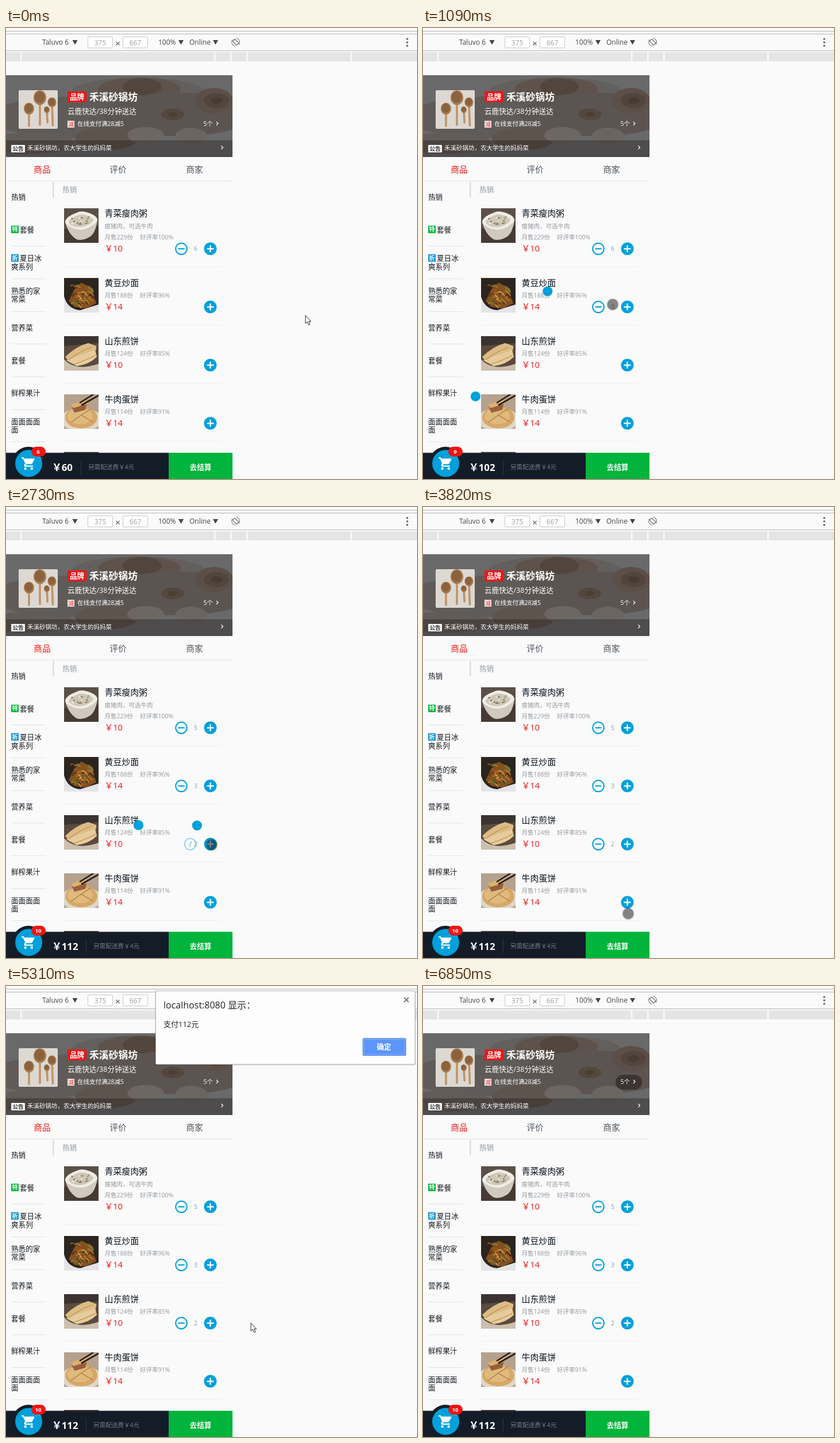
An HTML page that plays this animation: 715x783 px, repeating every 8.28 s.

```html
<!DOCTYPE html>
<html lang="zh-CN">
<head>
<meta charset="utf-8">
<style>
html, body { margin: 0; width: 100%; height: 100%; overflow: hidden; background: #fafafa; }
svg { display: block; font-family: "Open Sans", "Noto Sans CJK SC", "Noto Sans CJK", sans-serif; }
</style>
</head>
<body>
<svg id="stage" width="715" height="783" viewBox="0 0 715 783"></svg>
<script>
const LOOP = 8280;
const BLUE = '#00a0dc', RED = '#f01414', GREY = '#93999f', INK = '#07111b';

// Screen refreshes: [first, last, count]
const REFRESHES = [
  [0, 0, 1], [120, 1090, 8], [1240, 1760, 5], [2030, 3010, 8], [3160, 4060, 8],
  [4210, 4210, 1], [4610, 4730, 2], [5310, 5880, 5], [6160, 6850, 6]
];
// Cursor path: [time, x, y]
const PATH = [
  [0, 521, 499], [120, 505, 498], [540, 358, 486], [960, 356, 484], [1090, 330, 480],
  [1630, 305, 391], [2030, 305, 391], [2450, 358, 586], [3160, 358, 587], [3803, 357, 706],
  [4060, 354, 753], [4210, 339, 760], [5170, 339, 760], [5310, 426, 585], [5880, 640, 112],
  [6160, 640, 119], [6850, 480, 770]
];
// Taps: [time, dish, change]
const TAPS = [[590, 1, 1], [755, 1, 1], [920, 1, 1], [1700, 0, -1], [2578, 2, 1], [2712, 2, 1]];
const DISHES = [
  { name: '青菜瘦肉粥', sold: 229, rate: 100, price: 10, start: 6, y: 313, desc: '瘦猪肉，可选牛肉' },
  { name: '黄豆炒面', sold: 188, rate: 96, price: 14, start: 0, y: 434 },
  { name: '山东煎饼', sold: 124, rate: 85, price: 10, start: 0, y: 535 },
  { name: '牛肉蛋饼', sold: 114, rate: 91, price: 14, start: 0, y: 636 }
];
const buttonY = d => d.y + (d.desc ? 70 : 50);

const rect = (x, y, w, h, fill, extra = '') =>
  `<rect x="${x}" y="${y}" width="${w}" height="${h}" fill="${fill}" ${extra}/>`;
const oval = (x, y, rx, ry, fill, extra = '') =>
  `<ellipse cx="${x}" cy="${y}" rx="${rx}" ry="${ry}" fill="${fill}" ${extra}/>`;
const disc = (x, y, r, fill, extra) => oval(x, y, r, r, fill, extra);
const text = (s, x, y, size, fill, extra = '') =>
  `<text x="${x}" y="${y}" font-size="${size}" fill="${fill}" ${extra}>${s}</text>`;
const line = (d, color, width, extra = '') =>
  `<path d="${d}" fill="none" stroke="${color}" stroke-width="${width}" ${extra}/>`;
const shape = (d, fill) => `<path d="${d}" fill="${fill}"/>`;
const group = (attrs, body) => `<g ${attrs}>${body}</g>`;
const BOLD = 'font-weight="700"', MID = 'text-anchor="middle"', BOLD_MID = BOLD + ' ' + MID;

function seeded(seed) {
  return () => (seed = (seed * 16807) % 2147483647) / 2147483647;
}

function toolbar() {
  const arrow = x => shape(`M${x} 21h9l-4.5 8z`, '#444');
  const field = (x, s) => rect(x + .5, 15.5, 43, 19, '#fff', 'stroke="#c8c8c8" rx="1"') +
    text(s, x + 22, 30, 12, '#a0a0a0', MID);
  return line('M0 5.5H715M0 10.5H715M0 39.5H715', '#b4b4b4', 1) +
    text('Taluvo 6', 63, 29, 12, '#444') + arrow(115.5) + field(142, 375) +
    line('M191.5 24l6 6m0-6l-6 6', '#666', 1.1) + field(203, 667) +
    text('100%', 265, 29, 12, '#444') + arrow(300) + text('Online', 319, 29, 12, '#444') + arrow(360) +
    group('transform="translate(399.5 24.5) rotate(-45)"',
      rect(-2.8, -5, 5.6, 10, 'none', 'stroke="#6e6e6e" stroke-width="1.3" rx="1"') +
      line('M-5.6 4A7 7 0 0 1-1-6.9M5.6-4A7 7 0 0 1 1 6.9', '#777', 1)) +
    [19, 25, 31].map(y => disc(698, y, 1.8, '#666')).join('') +
    rect(0, 42, 715, 16, '#e5e5e5') +
    [26, 363, 391, 419, 600].map(x => rect(x - 1, 42, 2.5, 16, '#fafafa')).join('');
}

function avatar() {
  const spoon = (x, y, r, h, tilt) => group(`transform="rotate(${tilt} ${x} ${y})"`,
    rect(x - 1.8, y, 3.6, h, '#bd946a', 'rx="1.8"') + oval(x, y, r, r * 1.15, '#a77a4f') +
    oval(x - .5, y - 1, r * .8, r * .9, '#8b623e'));
  return rect(22, 108, 68, 67, '#ddd8d1', 'rx="2"') +
    spoon(40, 140, 9, 32, 0) + spoon(59, 121, 11, 49, 0) +
    spoon(71, 142, 5, 24, -3) + spoon(80, 129, 7.5, 42, -2);
}

function header() {
  const blobs = [
    [230, 110, 115, 24, '#635f5c'], [232, 106, 72, 20, '#5d534c'], [237, 102, 34, 15, '#52463c'],
    [120, 155, 150, 36, '#5f5b58'], [300, 150, 130, 38, '#5b5451'], [290, 150, 20, 10, '#54473d'],
    [290, 150, 8, 4, '#4a3e35'], [362, 126, 33, 22, '#5b4f48'], [366, 126, 22, 13, '#51453d'],
    [366, 126, 10, 6, '#473b33'], [40, 200, 80, 18, '#625c58'], [175, 192, 55, 20, '#5d544e'],
    [243, 186, 32, 14, '#6d6763'], [322, 188, 28, 15, '#6b6561']
  ];
  const chevron = (x, y) => line(`M${x} ${y - 3}l3 3-3 3`, '#fff', 1.2);
  return group('clip-path="url(#head)"', rect(0, 82, 394, 142, '#69696a') +
      blobs.map(b => oval(...b)).join('') + rect(0, 195, 394, 29, '#17120f', 'opacity=".32"')) +
    avatar() + rect(107, 110, 33, 19, '#e8191c', 'rx="2"') +
    text('品牌', 123.5, 124, 12.6, '#fff', BOLD_MID) +
    text('禾溪砂锅坊', 145, 126, 16.8, '#fff', BOLD) +
    text('云鹿快达/38分钟送达', 107, 149, 12.6, '#fff') +
    rect(107, 161, 12, 12, '#fbe3e1') + text('减', 113, 171, 10, '#d9443f', MID) +
    text('在线支付满28减5', 124, 170, 10.5, '#fff') +
    group('id="pill"', rect(335, 154, 46, 26, '#302a28', 'rx="13" opacity=".75"')) +
    text('5个', 343.5, 170, 10.5, '#fff') + chevron(366, 166) +
    rect(9, 203, 24, 13, '#f5f5f5', 'rx="1"') + text('公告', 21, 213, 9.5, '#333', BOLD_MID) +
    text('禾溪砂锅坊，农大学生的妈妈菜', 37, 212, 10.5, '#fff') + chevron(374.5, 207.5) +
    text('商品', 63, 250.5, 14.7, RED, MID) + text('评价', 195, 250.5, 14.7, '#4d555d', MID) +
    text('商家', 328, 250.5, 14.7, '#4d555d', MID) + rect(0, 265, 394, 1, '#e3e4e5');
}

function sidebar() {
  const rows = [['热销'], ['套餐'], ['夏日冰', '爽系列'], ['熟悉的家', '常菜'], ['营养菜'],
    ['套餐'], ['鲜榨果汁'], ['面面面面', '面']];
  const icons = { 1: ['特', '#00b43c'], 2: ['折', '#1296db'] };
  return rows.map((words, i) => {
    const mid = 293.5 + i * 56.7, top = mid + 4.5 - (words.length - 1) * 7.2, icon = icons[i];
    return words.map((w, n) => text(w, icon && !n ? 24 : 9, top + n * 14.4, 12.6, '#14191f')).join('') +
      (icon ? rect(9, top - 11.5, 13, 13, icon[1]) +
        text(icon[0], 15.5, top - 1.3, 10, '#fff', BOLD_MID) : '') +
      (i ? rect(9, Math.round(mid + 28), 60, 1, '#e3e4e6') : '');
  }).join('');
}

function porridge() {
  const rnd = seeded(17);
  let s = rect(0, 0, 60, 60, '#5b5048') + shape('M0 36L60 30V60H0z', '#463b33') +
    shape('M2 24Q8 46 22 54Q32 57 44 50Q55 44 58 20z', '#cfc9bf') +
    shape('M2 24Q2 17 14 11L26 6Q34 4 46 9Q58 14 58 21Q55 28 40 35Q26 40 14 34Q3 29 2 24z', '#efece5') +
    shape('M8 23Q12 16 27 11Q38 9 51 19Q51 25 37 31Q24 35 14 30Q8 27 8 23z', '#cfc7b6');
  for (let i = 0; i < 22; i++)
    s += oval(14 + rnd() * 32, 15 + rnd() * 13, 1.7, 1.2, ['#77796a', '#a48d74', '#eee8d8'][i % 3]);
  return s;
}
function noodles() {
  const rnd = seeded(91);
  let s = rect(0, 0, 60, 60, '#2b241f') + shape('M0 32Q6 54 28 56L60 46V60H0z', '#e4e3e5') +
    shape('M8 40L18 20 30 8 42 14 52 32 56 44 38 53 18 50z', '#84501f');
  for (let i = 0; i < 46; i++) {
    const x = 12 + rnd() * 32, y = 14 + rnd() * 32;
    s += line(`M${x} ${y}q${rnd() * 12 - 3} ${-8 * rnd()} 9 ${rnd() * 12 - 4}`,
      ['#c07c30', '#96561f', '#d39a4c', '#5c742c', '#4c2c14'][i % 5], 1.7);
  }
  return s;
}
function pancakes() {
  return rect(0, 0, 60, 60, '#5b4a3e') + shape('M0 0H60V12L0 17z', '#3a3331') +
    shape('M0 40Q20 62 60 48V60H0z', '#cdbfae') +
    shape('M2 36Q20 18 42 12L56 17Q58 30 36 42L10 46z', '#dcbc84') +
    shape('M4 42Q24 34 54 24L57 36Q44 49 22 52z', '#e6cc9c') +
    line('M8 41Q26 27 48 19M16 49Q36 43 55 33', '#b98c52', 1.2);
}
function beefCake() {
  return rect(0, 0, 60, 60, '#b5a18d') + oval(30, 44, 36, 20, '#dfd5c8') +
    oval(30, 40, 28, 19, '#d5a866') + oval(28, 38, 22, 14, '#e0ba7c') +
    line('M30 36L50 48M30 36L12 49M30 36L47 25', '#a9783f', 1.2) +
    shape('M13 22L40 14 37 27 18 32z', '#96603f') + shape('M12 18L38 9 42 16 16 24z', '#ddb06c') +
    line('M60 2L30 19M51 0L27 15', '#2a1d18', 2.6);
}

function dish(d, i) {
  const shift = d.desc ? 20 : 0, y = d.y, by = buttonY(d);
  const photo = [porridge, noodles, pancakes, beefCake][i]();
  return `<svg x="101" y="${y}" width="60" height="60">${photo}</svg>` +
    text(d.name, 171.5, y + 14, 14.9, INK) + (d.desc ? text(d.desc, 171.5, y + 34.5, 10.5, GREY) : '') +
    text(`月售${d.sold}份`, 171.5, y + 34 + shift, 10.5, GREY) +
    text(`好评率${d.rate}%`, 233, y + 34 + shift, 10.5, GREY) +
    text('￥' + d.price, 171.5, y + 54.5 + shift, 14.7, RED) +
    rect(101, y + 81 + shift, 274, 1, '#eeeff0') +
    disc(355.5, by + .3, 11, BLUE) + line(`M349.5 ${by + .3}h12m-6-6v12`, '#fff', 2.2) +
    group(`id="minus${i}"`, disc(0, 0, 9.8, 'none', `stroke="${BLUE}" stroke-width="2.1"`) +
      line('M-5.5 0H5.5', BLUE, 2.2)) +
    text('', 330, by + 4, 10.5, GREY, `id="count${i}" ` + MID);
}

function cartIcon() {
  return group('transform="translate(26 743) scale(1.1)"',
    shape('M1 2v2h2l3.6 7.6-1.4 2.4a2 2 0 0 0 1.8 3h12v-2H7.4l1.1-2h7.5a2 2 0 0 0 1.7-1l3.6-6.5' +
      'A1 1 0 0 0 20.4 4H5.2L4.3 2z', '#fff') + disc(7, 20, 2, '#fff') + disc(17, 20, 2, '#fff'));
}

function cartBar() {
  return rect(0, 737.5, 283, 46, '#141d27') + disc(39, 755, 28, '#141d27') + disc(39.5, 756, 23.5, BLUE) +
    cartIcon() +
    rect(44, 727, 25, 17, RED, 'rx="8.5"') + text('', 56, 739, 9.6, '#fff', `id="badge" ${BOLD_MID}`) +
    text('', 80, 768.5, 16.8, '#fff', 'id="total" ' + BOLD) +
    group('id="fee"', rect(130, 750, 1, 25, '#2d3640') + text('另需配送费￥4元', 143, 766, 10.6, '#747a80')) +
    rect(283, 737.5, 111, 46, '#00b43c') + text('去结算', 338.5, 767, 12.6, '#fff', BOLD_MID);
}

function dialog() {
  return group('id="dialog"',
    rect(259, 8, 454, 130, '#000', 'opacity=".12" rx="3"') +
    rect(260.5, 8.5, 451, 127.5, '#fdfdfd', 'stroke="#b5b5b5" rx="2"') +
    text('localhost:8080 显示：', 274, 39, 16, '#222') + text('支付112元', 274, 71, 13, '#222') +
    line('M692.5 20l8 8m0-8l-8 8', '#777', 1.8) +
    rect(621, 91, 74.5, 29.5, '#5c96fc', 'stroke="#3f78de" rx="1"') +
    rect(622.5, 92.5, 71.5, 26.5, 'none', 'stroke="#8cb5ff"') +
    text('确定', 657.5, 110, 12.6, '#fff', BOLD_MID));
}

const stage = document.getElementById('stage');
stage.innerHTML = '<clipPath id="head"><path d="M0 82H394V224H0z"/></clipPath>' +
  rect(0, 0, 715, 783, '#fafafa') + toolbar() + header() + sidebar() +
  rect(81, 267, 2.5, 27, '#d9dde1') + text('热销', 98, 284.5, 12.6, GREY) +
  DISHES.map(dish).join('') + rect(101, 736, 60, 10, '#5a4937') + cartBar() +
  TAPS.map((_, i) => disc(0, 0, 8.6, BLUE, `id="ball${i}"`)).join('') + dialog() +
  group('id="touch"', disc(0, 0, 11, '#000', 'opacity=".12"') + disc(0, 0, 9.5, '#1c1c1c', 'opacity=".46"')) +
  group('id="arrow"', '<path d="M0 0V14l3.2-3 2.5 5.5 2.3-1-2.5-5.2H9.5z" fill="#fff" stroke="#222"/>');

const el = id => document.getElementById(id);
const show = (id, on) => el(id).setAttribute('display', on ? 'inline' : 'none');
const move = (id, x, y, more = '') => el(id).setAttribute('transform', `translate(${x} ${y}) ${more}`);
const clamp = v => Math.max(0, Math.min(1, v));

function refreshTime(t) {
  let last = 0;
  for (const [a, b, n] of REFRESHES) {
    if (t < a) break;
    const step = n > 1 ? (b - a) / (n - 1) : 1;
    last = a + step * Math.min(n - 1, Math.floor((t - a) / step + 1e-6));
  }
  return last;
}

function cursorAt(t) {
  const i = PATH.findIndex(p => p[0] > t);
  if (i < 0) return PATH[PATH.length - 1].slice(1);
  const [a, x, y] = PATH[i - 1], [b, x2, y2] = PATH[i], k = (t - a) / (b - a);
  return [x + (x2 - x) * k, y + (y2 - y) * k];
}

// cubic-bezier(.49, -.29, .75, .41)
function toss(p) {
  const curve = (s, a, b) => 3 * (1 - s) ** 2 * s * a + 3 * (1 - s) * s * s * b + s ** 3;
  let lo = 0, hi = 1;
  for (let i = 0; i < 20; i++) {
    const s = (lo + hi) / 2;
    if (curve(s, .49, .75) < p) lo = s; else hi = s;
  }
  return curve(lo, -.29, .41);
}

function draw(t) {
  const counts = DISHES.map(d => d.start);
  TAPS.forEach(([at, dish, change], i) => {
    if (t >= at) counts[dish] += change;
    const p = (t - at) / 400;
    const flying = change > 0 && p >= 0 && p < 1;
    show('ball' + i, flying);
    if (flying) {
      const y = buttonY(DISHES[dish]) - 27.5;
      move('ball' + i, 346 - 304 * p, y + (751.5 - y) * toss(p));
    }
  });
  DISHES.forEach((d, i) => {
    const first = TAPS.find(tap => tap[1] === i);
    const k = d.start ? 1 : first ? clamp((t - first[0]) / 400) : 0;
    move('minus' + i, 305 + 25 * (1 - k), buttonY(d) + .3, `rotate(${180 * (1 - k)})`);
    el('minus' + i).setAttribute('opacity', k);
    el('count' + i).textContent = counts[i] || '';
  });
  const total = DISHES.reduce((sum, d, i) => sum + d.price * counts[i], 0);
  el('badge').textContent = counts.reduce((a, b) => a + b);
  el('total').textContent = '￥' + total;
  move('fee', total > 99 ? 9 : 0, 0);

  const leaving = t >= 6100;
  show('dialog', t >= 4610 && t < 6200);
  el('dialog').setAttribute('opacity', leaving ? .16 : t < 4730 ? .5 : 1);
  move('dialog', 0, leaving ? -17 : t < 4730 ? -8 : 0);
  show('pill', t >= 6200);

  const [x, y] = cursorAt(t), onPhone = x < 394 && y > 82, visible = t < 6849;
  show('touch', visible && onPhone);
  show('arrow', visible && !onPhone);
  move('touch', x, y);
  move('arrow', x, y);
}

const begin = performance.now();
function tick() {
  draw(refreshTime((performance.now() - begin) % LOOP));
  requestAnimationFrame(tick);
}
tick();
</script>
</body>
</html>
```
